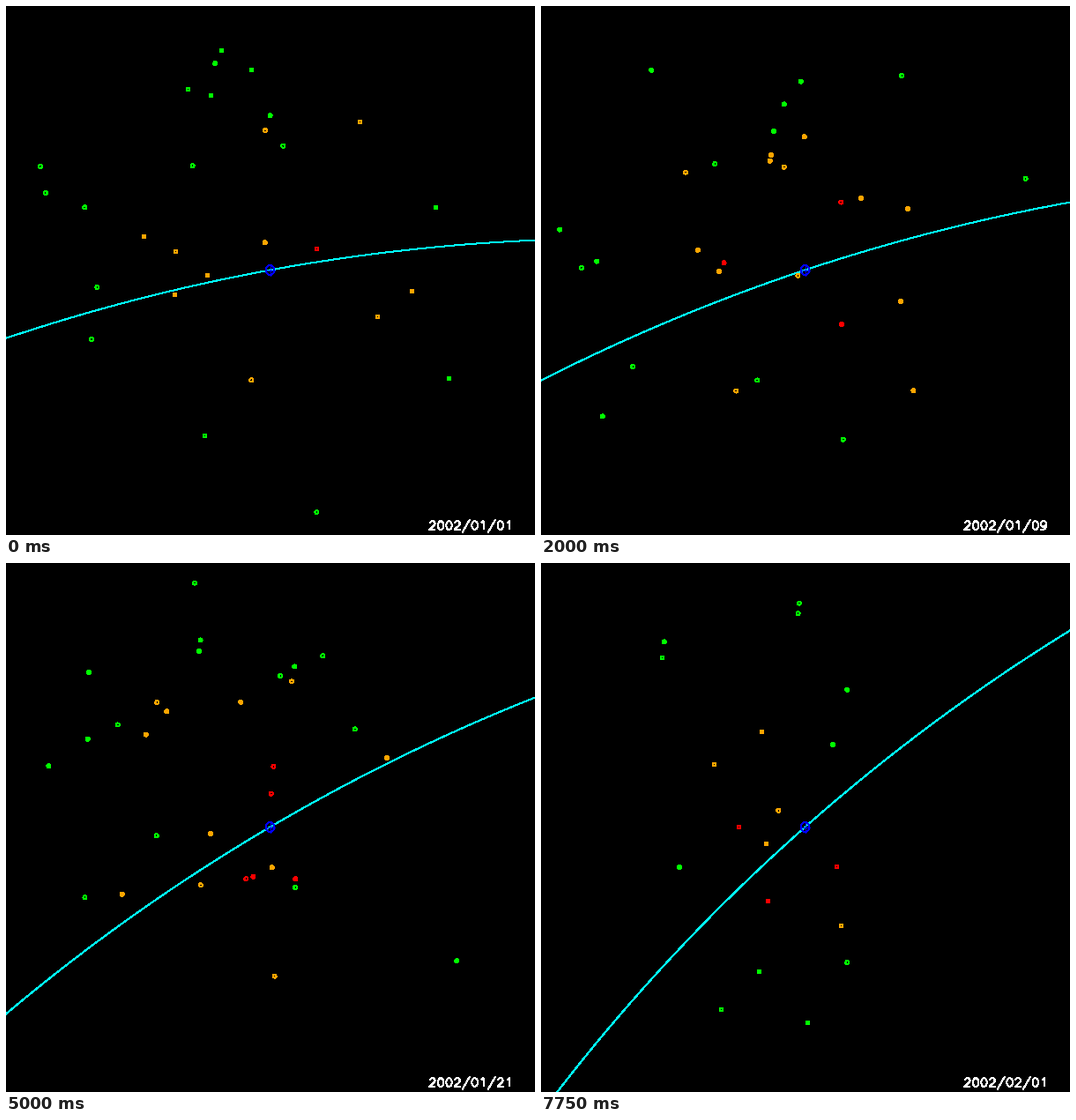
Recreate the animation shown at these times as a matplotlib script. Size 600 by 600 pixels, loop 8 s.

```python
import numpy as np
import matplotlib.pyplot as plt
from matplotlib.animation import FuncAnimation
from matplotlib.collections import LineCollection

SIZE, DPI, DAYS = 600, 100, 32
PX = 72 / DPI                       # one pixel in points
EARTH = np.array([299.0, 299.0])    # fixed on the stage
ORBIT_R = 2180.0                    # radius of Earth's orbit in pixels
TILT, TURN = np.radians(10.4), np.radians(1.003)
NEAR, MIDDLE, FAR = 100, 200, 300   # distance classes
RED, ORANGE, GREEN = "#ff0000", "#ffa500", "#00ff00"
VISITORS = 32

# Slow bodies: x, y and height above the ecliptic on the first and last day.
COMPANIONS = [
    ((191, 327, 150), (137, 107, -15)),
    ((228, 305, 88), (673, 551, -42)),
    ((352, 275, -30), (34, -122, 24)),
    ((421, 352, -30), (84, -178, -30)),
    ((225, 487, -30), (224, 299, -30)),
    ((502, 422, 60), (204, 506, -40)),
    ((460, 323, 50), (257, 383, 15)),
    ((487, 228, 147), (196, 228, -132)),
    ((401, 131, -30), (340 - 93, 463, 165)),
    ((156, 261, 75), (340, 411, -111)),
    ((192, 278, -20), (255, 318, 150)),
    ((244, 50, 40), (302, 521, 40)),
    ((232, 101, 60), (335, 344, -45)),
    ((206, 94, -15), (549, 290, 171)),
    ((278, 72, 140), (250, 191, 120)),
]


def sun_direction(day):
    a = TILT + TURN * day
    return np.array([np.sin(a), np.cos(a)])


def transitions(steps=10):
    """Day-by-day matrices of motion near Earth under the Sun's tide."""
    state, h, out = np.eye(4), 1 / steps, []
    for day in range(DAYS):
        out.append(state.copy())
        for k in range(steps):
            s = sun_direction(day + (k + 0.5) / steps)
            tide = TURN**2 * (3 * np.outer(s, s) - np.eye(2))
            state[:2] += state[2:] * h / 2
            state[2:] += tide @ state[:2] * h
            state[:2] += state[2:] * h / 2
    return np.array(out)


PHI = transitions()


def companion(first, last):
    """Daily positions relative to Earth, joining two known places."""
    p, q = np.array(first[:2]) - EARTH, np.array(last[:2]) - EARTH
    speed = np.linalg.solve(PHI[-1][:2, 2:], q - PHI[-1][:2, :2] @ p)
    xy = PHI[:, :2] @ np.concatenate([p, speed])
    return np.column_stack([xy, np.linspace(first[2], last[2], DAYS)])


def visitor(rng):
    """A fast straight flyby, mostly grazing the upper side."""
    side = rng.normal((0, -0.6, 0), 1)
    side /= np.linalg.norm(side)
    course = np.cross(side, rng.normal(size=3))
    course /= np.linalg.norm(course)
    days = np.arange(DAYS) - rng.uniform(-10, 34)
    return side * rng.uniform(150, 290) + np.outer(days * rng.uniform(14, 24), course)


rng = np.random.default_rng(7)
PATHS = np.array([companion(*ends) for ends in COMPANIONS]
                 + [visitor(rng) for _ in range(VISITORS)])


def arc(cx, cy, rx, ry, start=0, end=360, n=14):
    a = np.radians(np.linspace(start, end, n))
    return list(zip(cx + rx * np.cos(a), cy + ry * np.sin(a)))


# Stroke digits on a grid 20 wide and 21 high.
SIX = arc(13, 10.5, 9, 10.5, 65, 180) + arc(10.5, 7, 6.5, 7, 180, -180)
GLYPHS = {
    "0": [arc(10, 10.5, 7, 10.5)],
    "1": [[(6, 17), (8, 18), (11, 21), (11, 0)]],
    "2": [arc(10, 15, 6, 6, 170, -35) + [(3, 0), (17, 0)]],
    "3": [[(5, 21), (16, 21), (10, 13)] + arc(10, 6.5, 7, 6.5, 75, -155)],
    "4": [[(13, 0), (13, 21), (3, 7), (18, 7)]],
    "5": [[(15, 21), (5, 21), (4, 12)] + arc(10, 7, 7, 7, 115, -155)],
    "6": [SIX],
    "7": [[(3, 21), (17, 21), (7, 0)]],
    "8": [arc(10, 17, 6, 4), arc(10, 6.5, 7, 6.5)],
    "9": [[(20 - x, 21 - y) for x, y in SIX]],
    "/": [[(20, 25), (2, -7)]],
}


def strokes(text, x, y, scale):
    out = []
    for ch in text:
        for line in GLYPHS[ch]:
            out.append(np.array(line) * [scale, -scale] + [x, y])
        x += scale * (22 if ch == "/" else 20)
    return out


def date(day):
    month, d = divmod(day, 31)
    return f"2002/{month + 1:02d}/{d + 1:02d}"


fig = plt.figure(figsize=(SIZE / DPI, SIZE / DPI), dpi=DPI, facecolor="black")
ax = fig.add_axes([0, 0, 1, 1])
ax.set_xlim(0, SIZE)
ax.set_ylim(SIZE, 0)
ax.axis("off")


def thin_lines(lines, color, zorder):
    art = LineCollection(lines, colors=color, linewidths=PX,
                         antialiaseds=False, zorder=zorder)
    return ax.add_collection(art, autolim=False)


mid = EARTH + 0.5                   # centre of Earth's pixel
ex, ey = mid
orbit, = ax.plot([], [], color="#00ffff", lw=PX, antialiased=False, zorder=1)
rocks = ax.scatter([], [], s=(4 * PX) ** 2, linewidths=PX, zorder=2)
rocks.set_antialiased(False)
thin_lines([arc(ex, ey, 4.8, 5.4, n=24), [(ex - 5, ey), (ex + 5, ey)],
            [(ex, ey - 6), (ex, ey + 6)]], "#0000ff", 3)
label = thin_lines([], "white", 4)

SWEEP = np.linspace(-0.25, 0.25, 120)


def draw(day):
    sun = sun_direction(day)
    along = np.array([sun[1], -sun[0]])
    curve = mid + ORBIT_R * (np.outer(np.sin(SWEEP), along)
                             + np.outer(1 - np.cos(SWEEP), sun))
    orbit.set_data(curve[:, 0], curve[:, 1])

    pos = PATHS[:, day]
    dist = np.linalg.norm(pos, axis=1)
    seen = dist < FAR
    pos, dist = pos[seen], dist[seen]
    edge = [RED if d < NEAR else ORANGE if d < MIDDLE else GREEN for d in dist]
    rocks.set_offsets(pos[:, :2] + mid)
    rocks.set_edgecolor(edge)
    # Hollow below the ecliptic, solid above it.
    rocks.set_facecolor([c if z > 0 else "none" for c, z in zip(edge, pos[:, 2])])

    label.set_segments(strokes(date(day), 479, 594, 0.47))
    return orbit, rocks, label


anim = FuncAnimation(fig, draw, frames=DAYS, interval=250, repeat=True, repeat_delay=0)
plt.show()
```
